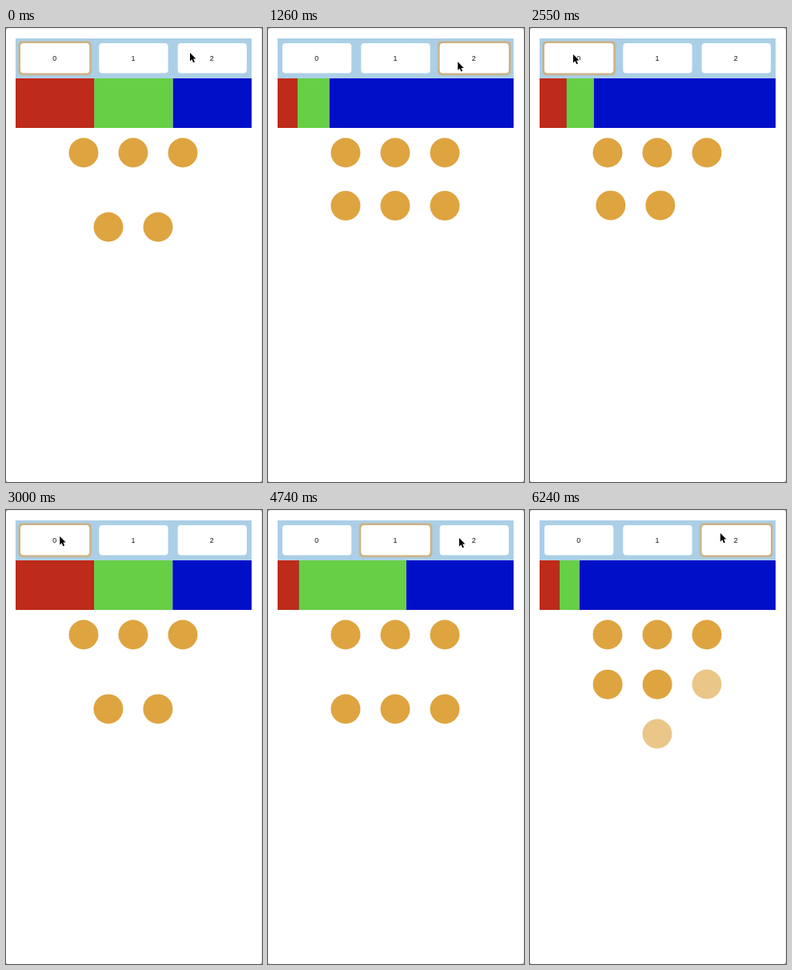
Write an HTML page with a canvas that moves like this. It is 320 px wide and 568 px high and loops after 6.27 s.

```html
<!DOCTYPE html>
<html lang="en">
<head>
<meta charset="utf-8">
<title>Flex layout transitions</title>
<style>
  html, body { margin: 0; width: 100%; height: 100%; overflow: hidden; background: #999; }
  canvas { display: block; width: 320px; height: 568px; }
</style>
</head>
<body>
<canvas id="stage"></canvas>
<script>
const LOOP = 6270, STEP = 30;
const LEFT = 12, WIDTH = 295, CELL = 62;
const COLORS = ['#be2b1a', '#66cf45', '#000fc8'];

// Flex weights of the bars and number of dots for each button
const STATES = [
  { flex: [1, 1, 1], dots: 5 },
  { flex: [1, 5, 5], dots: 6 },
  { flex: [1, 1, 10], dots: 7 }
];

// [time, button]
const CLICKS = [[-2000, 0], [150, 1], [1050, 2], [2513, 0], [3960, 1], [5230, 0], [5790, 2]];

// [time, x, y]
const POINTER = [
  [0, 230, 31], [150, 178, 34], [720, 170, 34], [1050, 237, 42], [1650, 238, 43],
  [2450, 54, 33], [2900, 54, 33], [3500, 233, 32], [3810, 233, 32], [3960, 185, 34],
  [4300, 172, 34], [4740, 239, 35], [5200, 60, 34], [5350, 60, 34],
  [5760, 238, 29], [LOOP, 238, 29]
];

const canvas = document.getElementById('stage');
const ctx = canvas.getContext('2d');
const ratio = window.devicePixelRatio || 1;
canvas.width = 320 * ratio;
canvas.height = 568 * ratio;
ctx.scale(ratio, ratio);

const mix = (a, b, p) => a + (b - a) * p;
const clamp = v => Math.max(0, Math.min(1, v));
const smooth = p => p * p * (3 - 2 * p);

// Critically damped spring
const spring = ms => 1 - Math.exp(-0.0165 * ms) * (1 + 0.0165 * ms);

function edges({ flex }) {
  const total = flex[0] + flex[1] + flex[2];
  let x = LEFT;
  return [x, ...flex.map(f => x += WIDTH * f / total)];
}

// Three dots per row, rows centred and sharing a fixed height
function dotAt({ dots }, i) {
  const rows = Math.ceil(dots / 3), row = Math.floor(i / 3);
  const inRow = Math.min(3, dots - row * 3);
  return [159 + (i % 3 - (inRow - 1) / 2) * CELL, 156 + row * 3 * CELL / rows];
}

function roundRect(x, y, w, h, r, color) {
  ctx.fillStyle = color;
  ctx.beginPath();
  ctx.roundRect(x, y, w, h, r);
  ctx.fill();
}

function drawButtons(active) {
  ctx.fillStyle = '#abcfe6';
  ctx.fillRect(LEFT, 13, WIDTH, 50);
  ctx.font = '9px "Liberation Sans", Arial, sans-serif';
  ctx.textAlign = 'center';
  for (let i = 0; i < 3; i++) {
    const x = LEFT + i * WIDTH / 3 + 6;
    if (i === active) {
      roundRect(x - 3, 16, 92.3, 43.5, 5, 'rgba(204,178,132,.5)');
      roundRect(x - 2, 17, 90.3, 41.5, 4.5, '#cbb284');
    }
    roundRect(x, 19, 86.3, 37.5, 4, '#fff');
    ctx.fillStyle = '#111';
    ctx.fillText(i, x + 42.7, 41);
  }
}

function drawBars(from, to, p) {
  const a = edges(from), b = edges(to);
  const x = a.map((v, i) => mix(v, b[i], p));
  COLORS.forEach((color, i) => {
    ctx.fillStyle = color;
    ctx.fillRect(x[i], 63, x[i + 1] - x[i], 62);
  });
  ctx.fillStyle = 'rgba(70,85,25,.6)';
  ctx.fillRect(x[1] - 1, 63, 1, 62);
  ctx.fillStyle = 'rgba(120,180,180,.6)';
  ctx.fillRect(x[2] - 1, 63, 1, 62);
}

function drawDots(from, to, p, age) {
  ctx.fillStyle = '#dea440';
  for (let i = 0; i < to.dots; i++) {
    const isNew = i >= from.dots;
    const b = dotAt(to, i), a = isNew ? b : dotAt(from, i);
    ctx.globalAlpha = isNew ? clamp((age - 300) / 240) : 1;
    ctx.beginPath();
    ctx.arc(mix(a[0], b[0], p), mix(a[1], b[1], p), 18.5, 0, Math.PI * 2);
    ctx.fill();
  }
  ctx.globalAlpha = 1;
}

function drawPointer(t) {
  const k = POINTER.findIndex(q => q[0] > t);
  const [t0, x0, y0] = POINTER[k - 1], [t1, x1, y1] = POINTER[k];
  const p = smooth((t - t0) / (t1 - t0));
  ctx.save();
  ctx.translate(mix(x0, x1, p), mix(y0, y1, p));
  const arrow = new Path2D('M0 0V10.5L2.4 8.3L4.1 12.3L5.9 11.5L4.2 7.6H7.4Z');
  ctx.strokeStyle = '#fff';
  ctx.lineWidth = 1.4;
  ctx.stroke(arrow);
  ctx.fillStyle = '#000';
  ctx.fill(arrow);
  ctx.restore();
}

function draw(now) {
  const t = Math.floor(now % LOOP / STEP) * STEP;
  const n = CLICKS.filter(c => c[0] <= t).length - 1;
  const [start, active] = CLICKS[n];
  const to = STATES[active], from = n ? STATES[CLICKS[n - 1][1]] : to;
  const age = t - start, p = spring(age);

  ctx.fillStyle = '#999';
  ctx.fillRect(0, 0, 320, 568);
  roundRect(0, 0, 320, 568, 3, '#eee');
  roundRect(0, 1, 319, 567, 3, '#fff');
  drawButtons(active);
  drawBars(from, to, p);
  drawDots(from, to, p, age);
  drawPointer(t);
}

const begin = performance.now();
function tick() {
  draw(performance.now() - begin);
  requestAnimationFrame(tick);
}
tick();
</script>
</body>
</html>
```
